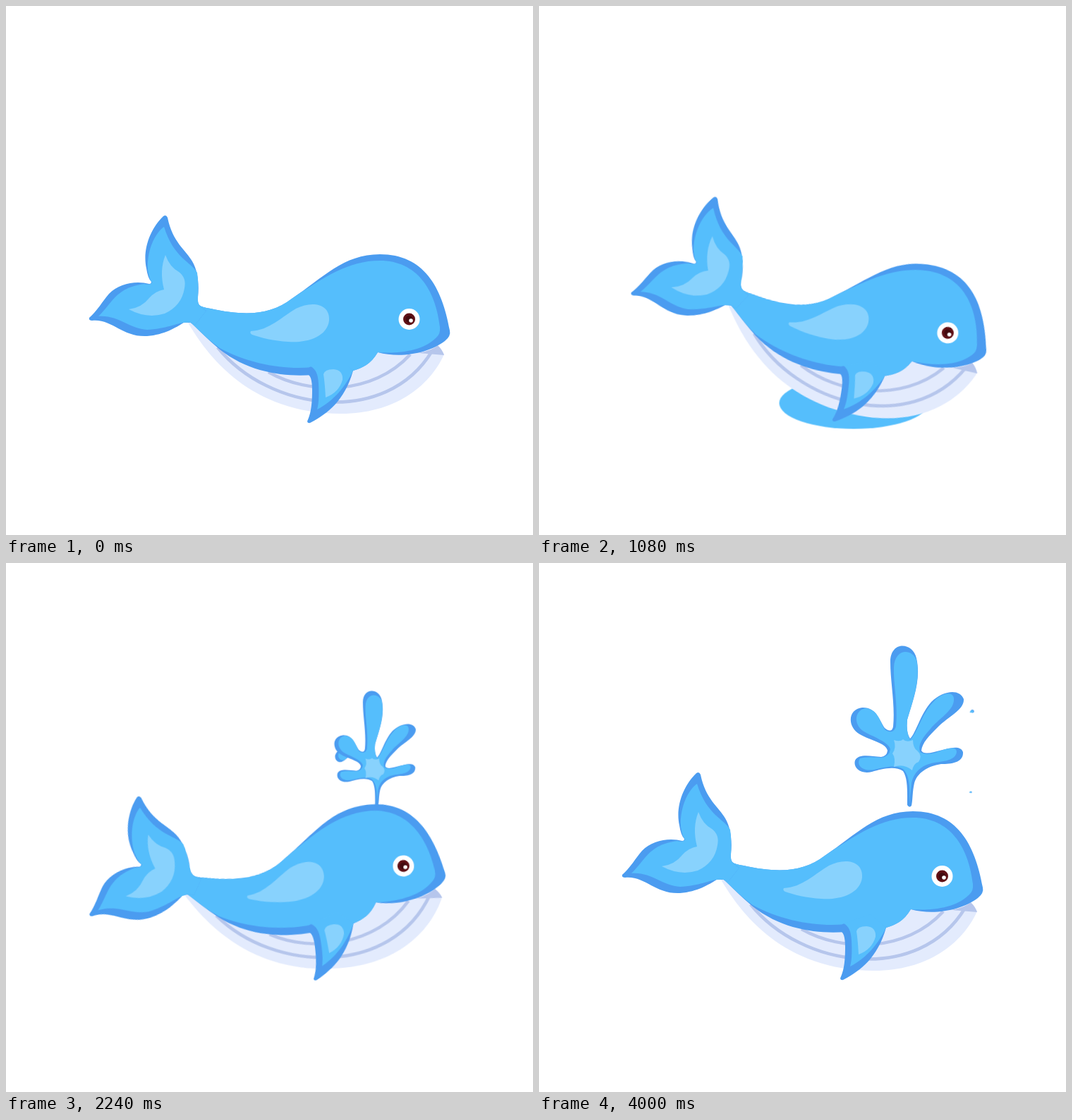
An HTML page without scripts for the animation above (4.04 s loop, 747 px wide and 750 px high).

```html
<!DOCTYPE html>
<html lang="en">
<head>
<meta charset="utf-8">
<title>Whale</title>
<style>
  html, body { margin: 0; width: 100%; height: 100%; overflow: hidden; background: #fff; }
  svg { display: block; width: 100vw; height: 100vh; }

  .base { fill: #55befc; }
  .shade { fill: #4b9cf0; }
  .shine { fill: #88d2fd; }
  .belly { fill: #e3ebfd; }
  .jaw { fill: #b6c6ec; }
  .fold { fill: none; stroke: #b6c6ec; stroke-width: 4.5; }

  .body, .tail, .eye, .pool, .spout, .move, .grow { animation: 4.04s linear infinite; }
  .body, .tail { animation-timing-function: cubic-bezier(.37, 0, .63, 1); }
  .body { animation-name: rock; transform-origin: 439px 509px; }
  .tail { animation-name: wag; transform-origin: 269px 424.5px; }
  .eye { animation-name: blink; transform-origin: 571px 444px; }
  .pool { animation-name: pool; transform-origin: 446px 563px; }
  .spout { animation-name: spout; transform-origin: 526px 345px; }
  .move { animation-name: move; animation-timing-function: cubic-bezier(.333, .667, .667, 1); }
  .grow { animation-name: grow; }
  .move, .grow { animation-delay: var(--d); animation-fill-mode: backwards; }

  @keyframes rock {
    0%, 66.83%, 100% { transform: rotate(0deg); }
    8.42%, 47.52% { transform: rotate(-10.1deg); }
    31.68% { transform: rotate(10.3deg); }
  }
  @keyframes wag {
    0%, 69.31%, 100% { transform: rotate(0deg); }
    10.89% { transform: rotate(-13deg); }
    33.66% { transform: rotate(-.9deg); }
    45.55% { transform: rotate(-12deg); }
  }
  @keyframes blink {
    0%, 18.81%, 22.77%, 100% { transform: scaleY(1); }
    20.79% { transform: scaleY(.06); }
  }
  @keyframes pool {
    0%, 3.47%, 11.39%, 22.77%, 36.63%, 48.52%, 54.95%, 100% { transform: scale(0); }
    7.43%, 51.98% { transform: scale(1.6); }
    28.22% { transform: scale(1.78); }
    33.66% { transform: scale(1); }
  }
  @keyframes spout {
    0%, 49.5% { transform: scale(0); }
    55.45% { transform: scale(.72); }
    66.34% { transform: scale(.855); }
    69.31%, 100% { transform: scale(1); }
  }
  @keyframes move {
    0% { transform: translate(522px, 262px); }
    30%, 100% { transform: translate(calc(522px + var(--x)), calc(262px + var(--y))); }
  }
  @keyframes grow {
    0%, 29%, 100% { transform: scale(0); }
    8%, 27% { transform: scale(1); }
  }
</style>
</head>
<body>
<svg viewBox="0 0 747 750">
  <defs>
    <g id="drop">
      <path class="shade" d="M-29 2C-29-20 20-24 30 14C15 8 8 14-8 14C-20 16-29 10-29 2Z"/>
      <path class="base" d="M-19 3C-19-16 18-18 30 14C15 8 8 13-5 13C-14 14-19 8-19 3Z"/>
    </g>
  </defs>

  <ellipse class="pool base" cx="446" cy="563" rx="81" ry="28"/>

  <g class="body">
    <path class="belly" d="M258 449C285 495 345 578 475 578C550 578 600 540 621 494L608 480L300 450Z"/>
    <path class="fold" d="M372 519C430 552 520 552 573 494"/>
    <path class="fold" d="M300 484C372 574 538 598 604 489"/>
    <path class="jaw" d="M585 492Q605 488 612 481Q619 488 621 495Z"/>

    <path class="shade" d="M250 448L274 424Q277 427 290 429C340 440 375 438 405 415C450 385 478 352 530 352C592 352 618 398 629 460Q631 468 622 475C600 492 560 500 527 491C517 508 505 513 492 517L435 523C395 526 345 520 303 487C285 472 270 456 262 449Z"/>
    <path class="base" d="M250 448L274 424Q277 427 290 429C340 440 375 438 405 415C450 385 485 361 530 361C582 361 609 402 615 455Q616 465 610 470C590 490 555 493 527 491C517 508 505 513 492 517L435 512C395 516 345 508 303 485C285 472 270 456 262 449Z"/>
    <path class="shine" d="M347 461C373 460 392 440 411 429C435 417 460 423 458 446C455 470 425 478 400 476C380 475 360 470 349 466Q345 464 347 461Z"/>

    <g class="tail">
      <path class="shade" d="M223 298C205 315 193 345 199 372Q201 386 206 391Q206 394 203 394C185 389 160 393 146 408C138 417 128 434 118 442Q117 446 122 446C150 443 165 470 200 468C225 466 240 456 252 449Q262 447 268 452L284 432Q270 426 272 413C274 395 272 375 264 362C255 346 236 335 229 300Q227 295 223 298Z"/>
      <path class="base" d="M224 313C213 320 199 345 201 374Q203 388 207 392Q205 396 196 394C176 397 164 402 150 418C142 428 137 434 131 440C160 438 175 458 200 459C225 458 245 449 252 449Q262 447 268 452L284 432Q270 426 272 413Q273 393 271 378C262 362 238 358 224 313Z"/>
      <path class="shine" d="M226 353Q232 370 245 377Q256 385 253 400Q249 425 225 436Q200 444 174 430Q192 428 203 414Q212 404 224 402Q217 375 226 353Z"/>
    </g>

    <path class="shade" d="M426 522Q434 522 434 545C434 570 431 580 427 589Q428 593 433 590C455 578 480 560 492 517L470 500L430 512Z"/>
    <path class="base" d="M432 511Q442 516 443 535C444 555 443 565 441 572C465 560 482 538 492 517L470 498Z"/>
    <path class="shine" d="M450 522Q452 515 464 515Q478 516 477 530Q472 548 453 555Q452 535 450 522Z"/>

    <g class="eye">
      <circle cx="571.5" cy="444" r="15" fill="#fff"/>
      <circle cx="571.5" cy="444" r="8.5" fill="#5f1016"/>
      <circle cx="571.5" cy="444" r="5" fill="#430b10"/>
      <circle cx="574" cy="446" r="2.8" fill="#fff"/>
    </g>
  </g>

  <g class="move" style="--d:2335ms;--x:-126px;--y:-95px"><g class="grow"><use href="#drop"/></g></g>
  <g class="move" style="--d:1980ms;--x:-112px;--y:22px"><g class="grow"><use href="#drop" transform="rotate(-35) scale(.6 .7)"/></g></g>
  <g class="move" style="--d:2550ms;--x:117px;--y:-146px"><g class="grow"><use href="#drop" transform="scale(-.8 .8)"/></g></g>
  <g class="move" style="--d:2695ms;--x:145px;--y:18px"><g class="grow"><use href="#drop" transform="rotate(15) scale(-.5 .75)"/></g></g>
  <g class="move" style="--d:2850ms;--x:92px;--y:-52px"><g class="grow"><use href="#drop" transform="scale(-.4 .6)"/></g></g>
  <g class="move" style="--d:2850ms;--x:90px;--y:63px"><g class="grow"><use href="#drop" transform="scale(-.25 .3)"/></g></g>

  <g class="spout">
    <path class="shade" d="M522 343C522 325 523 305 516 295C505 287 485 292 472 296C455 300 445 290 448 280C453 270 470 274 485 275Q493 274 494 266C492 255 470 252 455 243C436 232 438 207 458 205C478 204 482 222 490 234Q500 242 502 232C505 200 498 170 498 140C498 110 530 112 535 135C542 165 530 195 522 222Q520 240 526 249C535 240 540 215 556 197C573 180 597 178 602 193C603 208 580 218 566 232C553 245 543 255 542 266Q545 272 560 268C577 264 597 256 601 268C602 283 585 285 570 285C550 288 536 298 532 312C529 325 530 335 528 344Q525 348 522 343Z"/>
    <path class="base" d="M525 340C526 320 526 302 516 292C505 285 488 290 475 293C458 296 449 286 455 277Q465 274 485 276Q497 274 498 264C495 253 472 246 459 238C446 228 447 210 462 206C480 207 482 222 490 236Q502 244 506 232C509 200 502 170 503 148C504 122 527 120 535 137C541 165 530 195 522 222Q520 240 526 251C537 240 542 215 558 198C570 183 590 180 588 195C587 210 565 222 555 235C543 248 537 258 540 268Q548 273 562 269C575 264 592 258 592 268C590 282 568 281 556 284C540 288 531 298 528 312Z"/>
    <path class="shine" d="M503 251Q512 254 516 250Q521 255 530 251Q530 262 536 266Q544 273 538 282Q531 284 529 294Q517 284 503 289Q506 277 501 270Q507 262 503 251Z"/>
  </g>
</svg>
</body>
</html>
```
